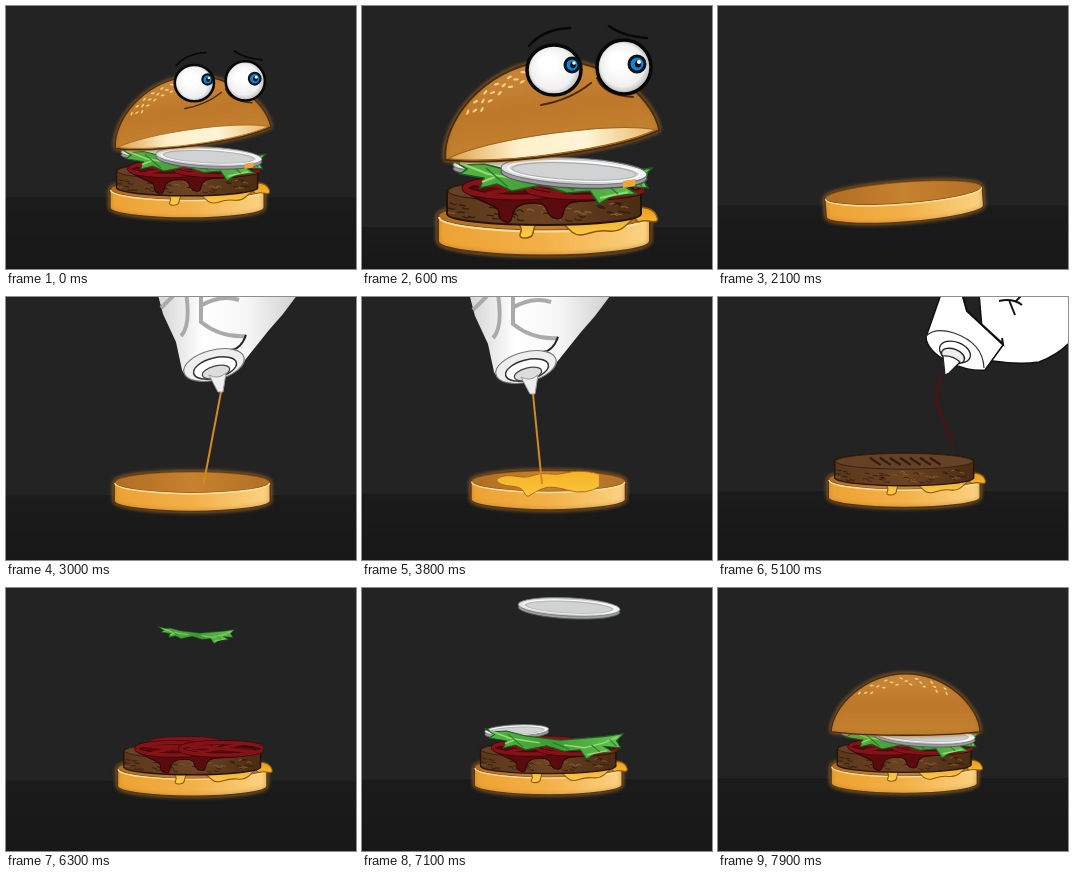
Recreate the animation shown at these times as an HTML page with a canvas. Size 350 px wide and 263 px high, loop 8000 ms.

```html
<!DOCTYPE html>
<html lang="en">
<head>
<meta charset="utf-8">
<title>Burger assembly</title>
<style>
html, body { margin: 0; width: 100%; height: 100%; overflow: hidden; background: #222; }
canvas { display: block; width: 350px; height: 263px; }
</style>
</head>
<body>
<canvas id="stage" width="350" height="263"></canvas>
<script>
const c = document.getElementById('stage').getContext('2d');
const LOOP = 8000, STEP = 100, BUILD = 1400;
const clamp = v => Math.max(0, Math.min(1, v));
const span = (t, a, b) => clamp((t - a) / (b - a));
const mix = (a, b, p) => a + (b - a) * p;

function paint(path, fill, stroke, width = 1.5) {
  if (fill) { c.fillStyle = fill; c.fill(path); }
  if (stroke) { c.strokeStyle = stroke; c.lineWidth = width; c.stroke(path); }
}
const draw = (d, fill, stroke, width) => paint(new Path2D(d), fill, stroke, width);
function oval(x, y, rx, ry, fill, stroke, width, turn = 0) {
  const p = new Path2D();
  p.ellipse(x, y, rx, ry, turn, 0, 7);
  paint(p, fill, stroke, width);
}
function ramp(x0, y0, x1, y1, ...colors) {
  const g = c.createLinearGradient(x0, y0, x1, y1);
  colors.forEach((k, i) => g.addColorStop(i / (colors.length - 1), k));
  return g;
}
// Closed smooth outline through the midpoints of the given points.
function blob(pts, fill, stroke, width) {
  const p = new Path2D(), n = pts.length;
  const mid = i => [(pts[i % n][0] + pts[(i + 1) % n][0]) / 2, (pts[i % n][1] + pts[(i + 1) % n][1]) / 2];
  p.moveTo(...mid(0));
  for (let i = 1; i <= n; i++) p.quadraticCurveTo(...pts[i % n], ...mid(i));
  p.closePath();
  paint(p, fill, stroke, width);
}
function group(fn) { c.save(); fn(); c.restore(); }
function glow(fn) {
  group(() => { c.shadowColor = '#a8702c'; c.shadowBlur = 4; fn(); });
}
function disc(x, y, rx, ry, h) {
  return `M${x - rx},${y}A${rx},${ry} 0 0 1 ${x + rx},${y}V${y + h}A${rx},${ry} 0 0 1 ${x - rx},${y + h}Z`;
}
function along(t, keys) {
  for (let i = 1; i < keys.length; i++) {
    const [a, ax, ay] = keys[i - 1], [b, bx, by] = keys[i];
    if (t >= a && t <= b) {
      const p = (t - a) / (b - a);
      return [mix(ax, bx, p), mix(ay, by, p)];
    }
  }
}
function fall(t, from, to, height, fn) {
  if (t < from) return;
  const p = span(t, from, to);
  group(() => { c.translate(0, -height * (1 - p ** 1.3)); fn(p); });
}
function wipe(left, right, fn) {
  group(() => { c.beginPath(); c.rect(left, 0, right - left, 300); c.clip(); fn(); });
}

function baseBun() {
  glow(() => draw(disc(182, 210, 106, 14.5, 25), ramp(76, 0, 288, 0, '#eda232', '#f3b048', '#fbd383'), '#59360f', 2));
  oval(182, 210, 105, 14, ramp(76, 0, 288, 0, '#b06c22', '#c7822f', '#b36f25'), '#7a4a14', 1);
  draw('M77,211A105,14.5 0 0 0 287,211', null, '#ffe0a0', 2);
}

const splat = [[108, 208], [125, 201], [153, 206], [171, 198], [194, 202], [221, 195], [256, 200], [263, 210], [245, 223],
  [221, 226], [201, 220], [180, 217], [162, 226], [152, 233], [146, 218], [119, 216]];
const cheese = () => blob(splat, ramp(0, 195, 0, 230, '#f5b222', '#fbc540'), '#a96812', 1.3);
function cheeseDrips() {
  const fill = ramp(0, 205, 0, 232, '#eda21f', '#ffd04e');
  blob([[150, 212], [176, 212], [172, 222], [170, 232], [156, 232], [161, 222]], fill, '#8d560d');
  blob([[195, 210], [280, 204], [268, 216], [256, 226], [236, 224], [216, 231], [204, 221]], fill, '#8d560d');
  blob([[270, 201], [291, 202], [298, 217], [282, 214], [274, 217]], fill, '#8d560d');
}

function patty() {
  draw(disc(182, 185, 97, 11, 23), ramp(85, 0, 279, 0, '#5b381b', '#6b4322', '#4a2c14'), '#241206', 2);
  oval(182, 185, 96, 11, '#654227', '#35200f', 1.3);
  let seed = 7;
  const rnd = () => (seed = seed * 16807 % 2147483647) / 2147483647;
  for (let i = 0; i < 50; i++) {
    const u = rnd() * 1.9 - .95, x = 182 + 97 * u, y = 189 + 11 * Math.sqrt(1 - u * u) + rnd() * 15;
    draw(`M${x - 4},${y}q4,${3 - rnd() * 6} 7,1`, null, i % 3 ? '#351d0b' : '#8a5b30', 1.3);
  }
  for (let i = 0; i < 7; i++) draw(`M${134 + i * 14},180l15,10`, null, '#321b0c', 3);
}

function ketchup() {
  const dark = '#590b0d', red = '#861218';
  blob([[98, 184], [125, 177], [182, 176], [264, 178], [276, 185], [250, 194], [210, 195], [202, 202], [200, 214], [187, 211],
    [183, 197], [161, 197], [151, 204], [149, 218], [136, 213], [138, 203], [122, 196]], dark, '#30070a');
  for (const [x, y, rx, ry] of [[173, 174, 50, 6], [156, 182, 53, 9], [224, 182, 59, 9]]) {
    oval(x, y, rx, ry, null, '#39070a', 7);
    oval(x, y, rx, ry, null, red, 5);
    draw(`M${x - rx * .8},${y - ry * .5}L${x + rx * .8},${y + ry * .5}M${x - rx * .6},${y + ry * .7}L${x + rx * .5},${y - ry * .8}`, null, red, 4);
  }
}

function lettuce() {
  draw('M90,154L104,159 122,158 150,165 200,171 262,166 290,162 280,172 286,182 262,180 275,188 250,190 237,198 228,185 205,187 180,179 150,185 135,178 118,182 122,172 98,168 105,163Z',
    ramp(90, 0, 290, 0, '#58b646', '#3f9c35', '#65c450'), '#1d5c20', 1.5);
  draw('M98,157L126,168 150,172 170,175M205,178L234,182 262,175 282,166M238,192L266,186M120,176L133,171', null, '#93dc72', 2);
  draw('M124,162L146,181M188,174L212,184M244,178L256,188M270,170L280,180', null, '#2a7a2b', 1.5);
}
function onion(x, y, rx, ry, turn) {
  oval(x, y + 4, rx, ry, '#9b9d9e', '#515354', 1.3, turn);
  oval(x, y, rx, ry, ramp(x - rx, y, x + rx, y, '#e4e6e6', '#c6c8c9', '#f4f5f5'), '#77797a', 1.2, turn);
  oval(x, y, rx * .9, ry * .74, '#d0d2d3', '#fff', 1.6, turn);
  oval(x, y + .5, rx * .85, ry * .64, null, '#9b9d9e', .8, turn);
}
function backOnion() { onion(137, 157, 46, 8, -.04); }
function frontOnion(t) {
  onion(212, 165, 73, 13, .05);
  if (t < BUILD) draw('M261,175L274,173 273,180 261,182Z', '#eda637');
}

function dome(open) {
  c.lineJoin = 'round';
  const edge = open ? 'C60,17 -55,16 -108,2Z' : 'C60,9 -60,9 -108,2Z';
  glow(() => draw('M-108,2C-106,-36 -58,-82 0,-82C58,-82 106,-36 108,2' + edge,
    ramp(0, -82, 0, 8, '#cc8939', '#bd7829', '#c4822f'), '#4a2b0c', 2));
  if (open) draw('M-105,1C-60,-13 60,-13 105,1C60,15 -55,14 -105,1Z', ramp(-105, 0, 105, 0, '#dda14a', '#fff0c9', '#fff4d6', '#e8b765'), '#9c641f', 1);
  for (let i = 0; i < 20; i++) {
    const a = open ? -2.55 + i * .052 : -2.35 + i * .079;
    const r = 1 - .055 * (1 + i % 3);
    const x = Math.cos(a) * 101 * r, y = Math.sin(a) * 80 * r;
    oval(x, y, 2.8, 1.2, '#f3cf82', null, 0, a + 1.5 + (i % 2) * .5);
  }
}

function eye(x, y, rx, ry, ix, iy, ir) {
  const g = c.createRadialGradient(x - 6, y - 6, 8, x, y, rx);
  g.addColorStop(0, '#fff');
  g.addColorStop(.7, '#f0f0f0');
  g.addColorStop(1, '#b5b5b5');
  oval(x, y, rx, ry, g, '#080808', 3.5);
  oval(ix, iy, ir, ir, '#1683cc', '#07131d', 3);
  oval(ix + 1, iy, ir * .4, ir * .45, '#06101a');
  oval(ix + 2, iy - 2, ir * .25, ir * .25, '#fff');
}
function face() {
  c.lineCap = 'round';
  draw('M179,99Q208,94 229,77M235,72Q241,89 271,91', null, '#4b2a0c', 2);
  eye(192, 64, 27, 25, 210, 59, 7);
  eye(262, 61, 27, 27, 275, 58, 8);
  draw('M167,40Q181,23 208,22M247,20Q260,30 285,32', null, '#080808', 2.5);
}

function cheeseBottle(x, y) {
  c.translate(x, y);
  c.filter = 'blur(0.7px)';
  draw('M-63,-200V-97L-58,-78 -45,-50 -39,-22C-34,-8 16,-8 24,-32L48,-62 62,-78 80,-102V-200Z', ramp(-60, 0, 70, 0, '#d8d8d8', '#fff', '#f6f6f6', '#d5d5d5'));
  draw('M-60,-84L-46,-98M-40,-56Q-30,-66 -35,-100M-20,-100V-70Q0,-54 25,-56M-21,-86Q0,-98 18,-92', null, '#aaa', 4);
  draw('M25,-57Q20,-43 10,-42', null, '#222', 2);
  oval(-7, -27, 31, 15, '#eee', '#777', 1.2, -.25);
  oval(-6, -24, 22, 10, '#fff', '#333', 1.5, -.25);
  oval(-5, -20, 14, 6, '#ddd', '#444', 1.3, -.25);
  draw('M-12,-17L-3,0 2,0 5,-19Q-3,-12 -12,-17Z', '#eee', '#999', 1);
}
function ketchupBottle(x, y) {
  c.translate(x, y);
  draw('M40,-10L48,-14Q75,-10 94,-13Q112,-20 123,-31L330,-150V-250H20Z', '#fff', '#111', 1.5);
  draw('M-5,-78L-19,-38C-19,-20 18,-2 40,-5L58,-30 22,-64 18,-78V-200H-5Z', '#fff', '#111', 1.5);
  draw('M18,-78L22,-64 58,-31 57,-37M54,-74Q68,-77 77,-70M64,-75L70,-60M70,-73L76,-79', null, '#111', 2);
  draw('M-19,-39Q-10,-48 9,-42Q38,-32 39,-7', null, '#333', 1.2);
  oval(10, -23, 16, 10, '#fff', '#222', 1.3, .35);
  oval(8, -19, 12, 7, '#eee', '#222', 1.3, .35);
  draw('M-2,-19L0,0 4,-2 15,-13Q7,-20 -2,-19Z', '#fff', '#222', 1.2);
}

const cheesePath = [[2600, 400, 20], [3000, 215, 95], [3200, 150, 96], [3400, 115, 95], [3600, 225, 97], [3800, 171, 97], [4000, 215, 90], [4300, 420, 20]];
const ketchupPath = [[4700, 380, 20], [5000, 238, 76], [5100, 227, 78], [5300, 140, 80], [5400, 80, 79], [5600, 215, 78], [5700, 310, 50], [5800, 460, 0]];
function pouring(t) {
  const a = along(t, cheesePath), b = along(t, ketchupPath);
  if (a) {
    const [x, y] = a;
    if (t >= 3000 && t < 4000) draw(`M${x},${y}L${186 + (x - 186) * .4},187`, null, '#d08a24', 2);
    group(() => cheeseBottle(x, y));
  }
  if (b) {
    const [x, y] = b;
    if (t >= 5100 && t < 5700) {
      const end = t < 5200 ? 148 : 163, ex = t < 5200 ? x + 9 : mix(186, x, .6);
      draw(`M${x - 3},${y}C${x - 14},${y + 22} ${x - 8},${y + 32} ${ex},${end}`, null, '#561012', 2);
    }
    group(() => ketchupBottle(x, y));
  }
}

function burger(t) {
  const built = t < BUILD;
  const now = built ? LOOP : t;
  if (now >= 1600) group(() => {
    const p = span(now, 1600, 2100);
    c.translate(mix(20, 182, p), mix(-100, 223, p * p));
    c.rotate(now < 2100 ? mix(-.6, -.075, p) : -.075 * (1 - span(now, 2100, 2300)));
    c.translate(-182, -223);
    baseBun();
  });
  const spread = span(now, 3000, 3900);
  if (spread && now < 4800) wipe(105, 105 + 165 * spread, cheese);
  if (now >= 4700) cheeseDrips();
  fall(now, 4400, 4800, 270, patty);
  const sauce = span(now, 5200, 5900);
  if (sauce) wipe(282 - 195 * sauce, 282, ketchup);
  fall(now, 6800, 7100, 180, backOnion);
  fall(now, 6200, 6700, 175, p => {
    const s = p < 1 ? mix(.46, 1, p ** 1.2) : 1;
    c.translate(185, 172);
    c.scale(s, s);
    c.translate(-185, -172);
    lettuce();
  });
  fall(now, 7100, 7450, 185, () => frontOnion(t));
  if (built) {
    group(() => { c.translate(190, 137); c.rotate(-.138); dome(true); });
    group(face);
  } else fall(now, 7500, 7800, 99, () => { c.translate(184, 158); dome(false); });
}

function backdrop(floor) {
  c.fillStyle = '#232323';
  c.fillRect(0, 0, 350, 263);
  c.fillStyle = ramp(0, floor, 0, 263, '#1b1b1b', '#181818');
  c.fillRect(0, floor, 350, 263 - floor);
}
function render(t) {
  c.setTransform(1, 0, 0, 1, 0, 0);
  if (t < BUILD) {
    // Zoom in on the finished burger.
    const s = mix(1 / 1.375, 1, span(t, 0, 600)), q = (1 - s) / (1 - 1 / 1.375);
    const x = 67 / 1.375 * q, y = 42 / 1.375 * q;
    backdrop(221 * s + y);
    group(() => { c.translate(x, y); c.scale(s, s); burger(t); });
  } else {
    // The camera pulls back slowly while the layers stack up.
    const k = 1 + .08 * (7900 - t) / 5800;
    backdrop(72 + 118 * k);
    group(() => {
      c.translate(186, 72);
      c.scale(k, k);
      c.translate(88 / 1.45 - 186, 33.3 - 72);
      c.scale(1 / 1.45, 1 / 1.45);
      burger(t);
    });
    pouring(t);
  }
}
const start = performance.now();
function tick() {
  const t = (performance.now() - start) % LOOP;
  render(Math.floor(t / STEP) * STEP);
  requestAnimationFrame(tick);
}
tick();
</script>
</body>
</html>
```
